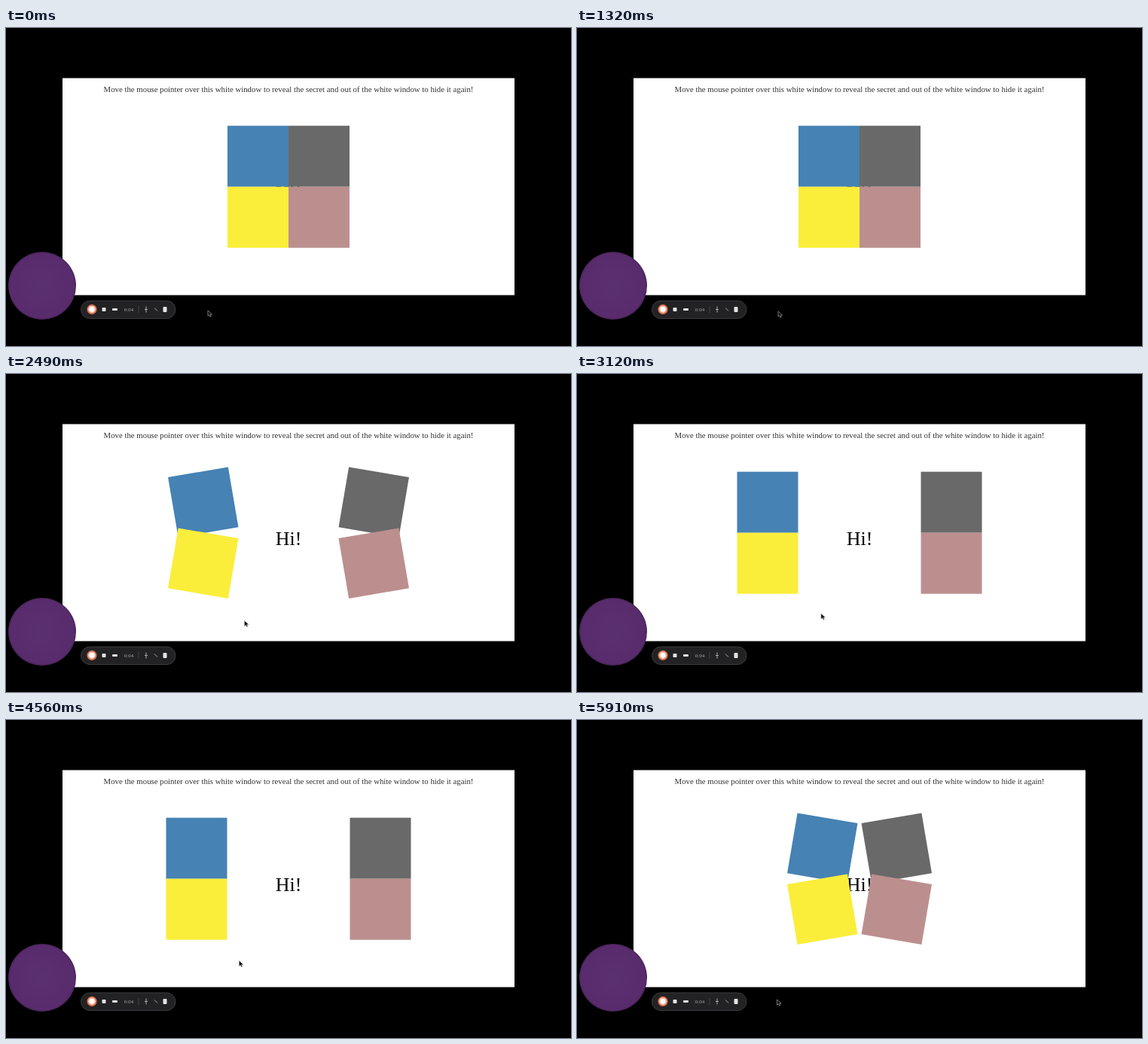
An HTML page that plays this animation: 750 px wide and 422 px high, repeating every 5.94 s.

```html
<!DOCTYPE html>
<html lang="en">
<head>
<meta charset="utf-8">
<title>Secret behind four squares</title>
<style>
  html, body { margin: 0; width: 100%; height: 100%; overflow: hidden; background: #000; }
  svg { display: block; width: 100%; height: 100%; }
  text { font-family: "Liberation Serif", Times, serif; text-anchor: middle; }
</style>
</head>
<body>
<svg viewBox="0 0 750 422">
  <defs>
    <radialGradient id="purple">
      <stop offset="0" stop-color="#5b3070"/>
      <stop offset=".95" stop-color="#582b6d"/>
      <stop offset="1" stop-color="#43214f"/>
    </radialGradient>
  </defs>

  <rect x="75" y="66.5" width="600" height="288" fill="#fff"/>
  <text x="375" y="85" font-size="10.8" fill="#333">Move the mouse pointer over this white window to reveal the secret and out of the white window to hide it again!</text>
  <text x="375" y="226.5" font-size="26">Hi!</text>
  <g id="squares"></g>

  <circle cx="48" cy="342" r="45" fill="url(#purple)"/>

  <!-- recorder bar -->
  <rect x="99.5" y="362" width="125.5" height="23.5" rx="11.7" fill="#222224" stroke="#3c3c3e"/>
  <circle cx="114" cy="373.3" r="5.6" fill="#fff" stroke="#df714f" stroke-width="2"/>
  <circle cx="114" cy="373.3" r="4" fill="none" stroke="#f3c3ad"/>
  <g fill="#e4e4e4">
    <rect x="127.5" y="371" width="5" height="5" rx="1"/>
    <rect x="141" y="372" width="7" height="3" rx="1"/>
    <rect x="208.5" y="370" width="5" height="7" rx="1"/>
  </g>
  <text x="163" y="375.5" font-size="7" fill="#aaa">0:04</text>
  <path d="M176 369v9" stroke="#444"/>
  <path d="M186 369.5v8M184 373.5h4M197 371.5l4 4" stroke="#aaa" fill="none"/>

  <path id="cursor" d="M0 0v7.2l1.8-1.6 1.2 2.6 1.3-.6-1.2-2.5h2.5z" fill="#000" stroke="#aaa" stroke-width=".7"/>
</svg>
<script>
const LOOP = 5940, ENTER = 1880, LEAVE = 5300, DURATION = 1000;
const SIDE = 81, SLIDE = 81.5, CX = 375, CY = 210.7;

// colour, horizontal side, vertical side
const squares = [
  ["#4682b4", -1, -1], ["#696969", 1, -1],
  ["#faee3b", -1, 1], ["#bc8f8f", 1, 1]
].map(([fill, sx, sy]) => {
  const el = document.createElementNS("http://www.w3.org/2000/svg", "rect");
  const attrs = { x: -SIDE / 2, y: -SIDE / 2, width: SIDE, height: SIDE, fill };
  for (const name in attrs) el.setAttribute(name, attrs[name]);
  document.getElementById("squares").append(el);
  return { el, sx, sy };
});

// time, x, y of the pointer tip
const path = [
  [0, 268, 375], [1320, 267, 376], [1650, 268, 375], [1880, 287, 354],
  [2010, 292, 349], [2500, 317, 327], [3120, 324, 318], [4560, 309.5, 319.5],
  [4900, 300, 330], [5300, 277, 351.5], [5500, 270, 364], [5910, 265.5, 371], [LOOP, 265.5, 371]
];
const cursor = document.getElementById("cursor");

const bezier = (a, b, u) => 3 * a * u * (1 - u) ** 2 + 3 * b * u * u * (1 - u) + u ** 3;

// cubic-bezier(.25, .1, .25, 1)
function ease(x) {
  if (x <= 0) return 0;
  if (x >= 1) return 1;
  let lo = 0, hi = 1;
  for (let i = 0; i < 24; i++) {
    const mid = (lo + hi) / 2;
    if (bezier(.25, .25, mid) < x) lo = mid; else hi = mid;
  }
  return bezier(.1, 1, lo);
}

function pointerAt(t) {
  const i = path.findIndex(p => p[0] > t);
  const [t0, x0, y0] = path[i - 1], [t1, x1, y1] = path[i];
  const k = (t - t0) / (t1 - t0);
  return [x0 + (x1 - x0) * k, y0 + (y1 - y0) * k];
}

function draw() {
  const t = performance.now() % LOOP;
  const open = ease((t - ENTER) / DURATION) - ease((t - LEAVE) / DURATION);
  for (const { el, sx, sy } of squares) {
    const x = CX + sx * (SIDE / 2 + SLIDE * open);
    const y = CY + sy * SIDE / 2;
    el.setAttribute("transform", `translate(${x} ${y}) rotate(${sx * sy * 90 * open})`);
  }
  cursor.setAttribute("transform", `translate(${pointerAt(t)})`);
  requestAnimationFrame(draw);
}
draw();
</script>
</body>
</html>
```
